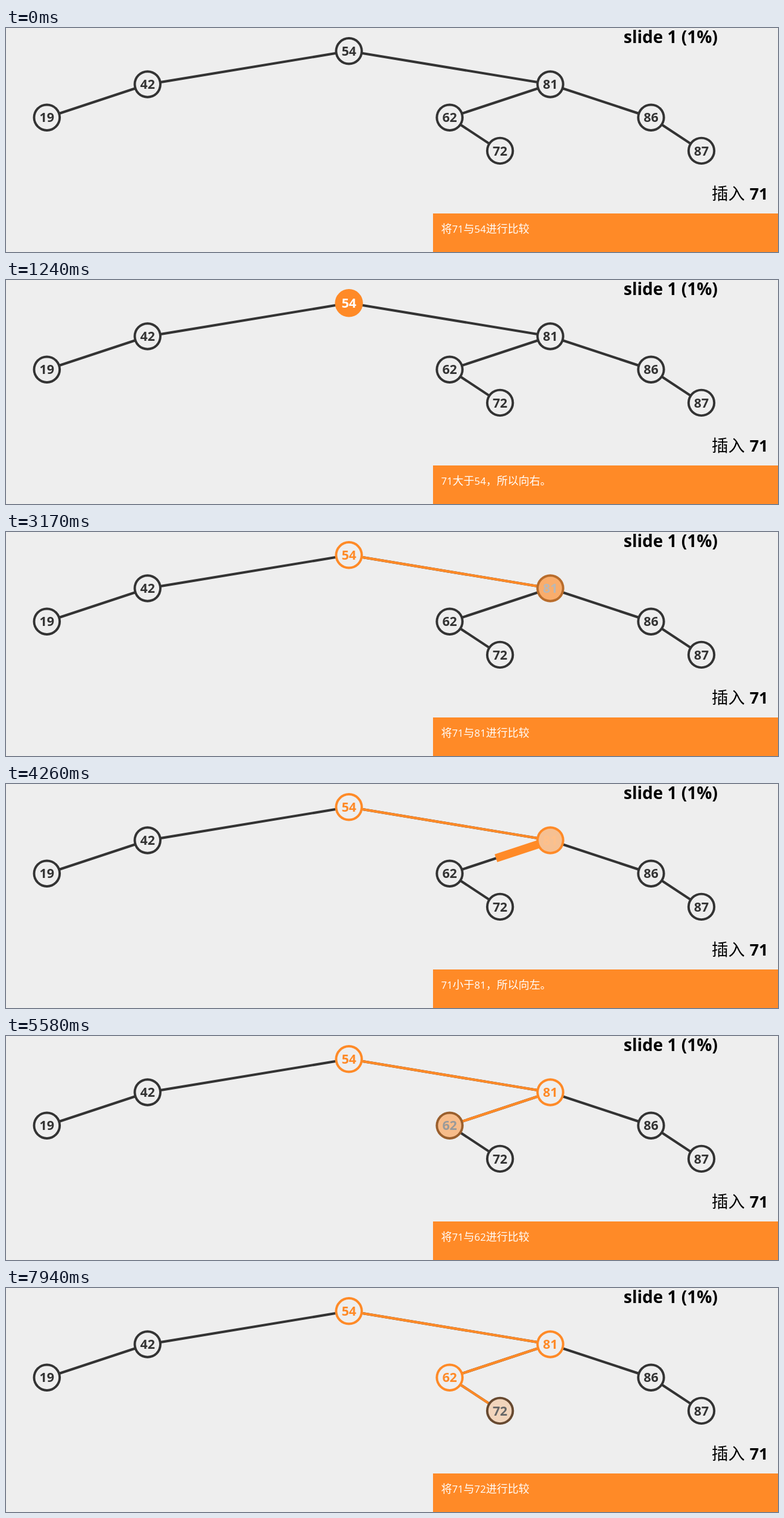
Recreate the animation shown at these times as an HTML page. Size 1280 px wide and 372 px high, loop 8 s.

```html
<!DOCTYPE html>
<html lang="zh-CN">
<head>
<meta charset="utf-8">
<title>二叉搜索树插入</title>
<style>
  html, body { margin: 0; width: 100%; height: 100%; overflow: hidden; background: #eee; }
  svg { display: block; width: 1280px; height: 372px; }
  text { font-family: "Open Sans", "Noto Sans", sans-serif; white-space: pre; }
  .bold { font-weight: 700; }
  .han { font-family: "Noto Sans CJK SC", "Noto Sans CJK", sans-serif; font-weight: 300; }
  .key { font-weight: 700; font-size: 21.4px; text-anchor: middle; }
</style>
</head>
<body>
<svg id="stage" viewBox="0 0 1280 372"></svg>
<script>
const LOOP = 8000, STEP = 800, SHRINK = 400;
const THIN = 4.1, THICK = 13.8;
const DARK = [51, 51, 51], PAPER = [238, 238, 238], ORANGE = [255, 138, 39], WHITE = [255, 255, 255];

// fill: when the node starts to light up; leave: when it fades and its edge grows
const nodes = {
  54: { x: 568.6, y: 38.3, fill: 290, leave: 1300 },
  42: { x: 234.7, y: 93.5, parent: 54 },
  81: { x: 902.5, y: 93.5, parent: 54, fill: 2725, leave: 3850 },
  19: { x: 67.8, y: 148.7, parent: 42 },
  62: { x: 735.6, y: 148.7, parent: 81, fill: 5180, leave: 6355 },
  86: { x: 1069.5, y: 148.7, parent: 81 },
  72: { x: 819.1, y: 203.9, parent: 62, fill: 7622 },
  87: { x: 1153, y: 203.9, parent: 86 }
};

const messages = [
  [0, '将71与54进行比较'],
  [1210, '71大于54，所以向右。'],
  [2580, '将71与81进行比较'],
  [3690, '71小于81，所以向左。'],
  [4940, '将71与62进行比较'],
  [6130, '71大于62，所以向右。'],
  [7560, '将71与72进行比较']
];

const stage = document.getElementById('stage');
const lerp = (a, b, k) => a + (b - a) * k;
const rgb = color => `rgb(${color.map(Math.round)})`;
const mix = (a, b, k) => a.map((v, i) => lerp(v, b[i], k));

// Cubic in-out progress; 0 when the start is undefined
function progress(t, start, duration = STEP) {
  const k = Math.min(1, Math.max(0, (t - start) / duration || 0));
  return k < .5 ? 4 * k ** 3 : 1 - 4 * (1 - k) ** 3;
}

const line = (a, x, y, color, width) =>
  `<line x1="${a.x}" y1="${a.y}" x2="${x}" y2="${y}" stroke="${rgb(color)}" stroke-width="${width}"/>`;

function drawEdge(node, t) {
  const parent = nodes[node.parent];
  if (!parent) return '';
  let out = line(parent, node.x, node.y, DARK, THIN);
  const grown = node.fill ? progress(t, parent.leave) : 0;
  if (grown > 0) {
    const width = lerp(THICK, THIN, progress(t, parent.leave + STEP, SHRINK));
    out += line(parent, lerp(parent.x, node.x, grown), lerp(parent.y, node.y, grown), ORANGE, width);
  }
  return out;
}

function drawNode([key, { x, y, fill, leave }], t) {
  const lit = progress(t, fill), left = progress(t, leave);
  const ring = mix(DARK, ORANGE, lit);
  const inside = mix(mix(PAPER, ORANGE, lit), PAPER, left);
  const ink = mix(mix(DARK, WHITE, lit), ORANGE, left);
  return `<circle cx="${x}" cy="${y}" r="23.2" fill="${rgb(ring)}"/>
    <circle cx="${x}" cy="${y}" r="19.3" fill="${rgb(inside)}"/>
    <text class="key" x="${x}" y="${y + 7.6}" fill="${rgb(ink)}">${key}</text>`;
}

function drawMessage(t) {
  const text = messages.filter(([start]) => t >= start).pop()[1];
  const runs = text.replace(/\d+|\D+/g, run =>
    /\d/.test(run) ? `<tspan font-size="16.7">${run}</tspan>` : `<tspan class="han" font-size="18">${run}</tspan>`);
  return `<rect x="708" y="308" width="572" height="64" fill="${rgb(ORANGE)}"/>
    <text x="721.5" y="340" fill="#fff">${runs}</text>`;
}

function draw(now) {
  const t = now % LOOP;
  stage.innerHTML =
    Object.values(nodes).map(node => drawEdge(node, t)).join('') +
    Object.entries(nodes).map(entry => drawNode(entry, t)).join('') +
    `<text class="bold" x="1024" y="25" font-size="28">slide 1 (1%)</text>
     <text class="han" x="1170" y="285" font-size="27.5">插入</text>
     <text class="bold" x="1233" y="285" font-size="26.8">71</text>` +
    drawMessage(t);
}

const begin = performance.now();
function tick() {
  draw(performance.now() - begin);
  requestAnimationFrame(tick);
}
tick();
</script>
</body>
</html>
```
